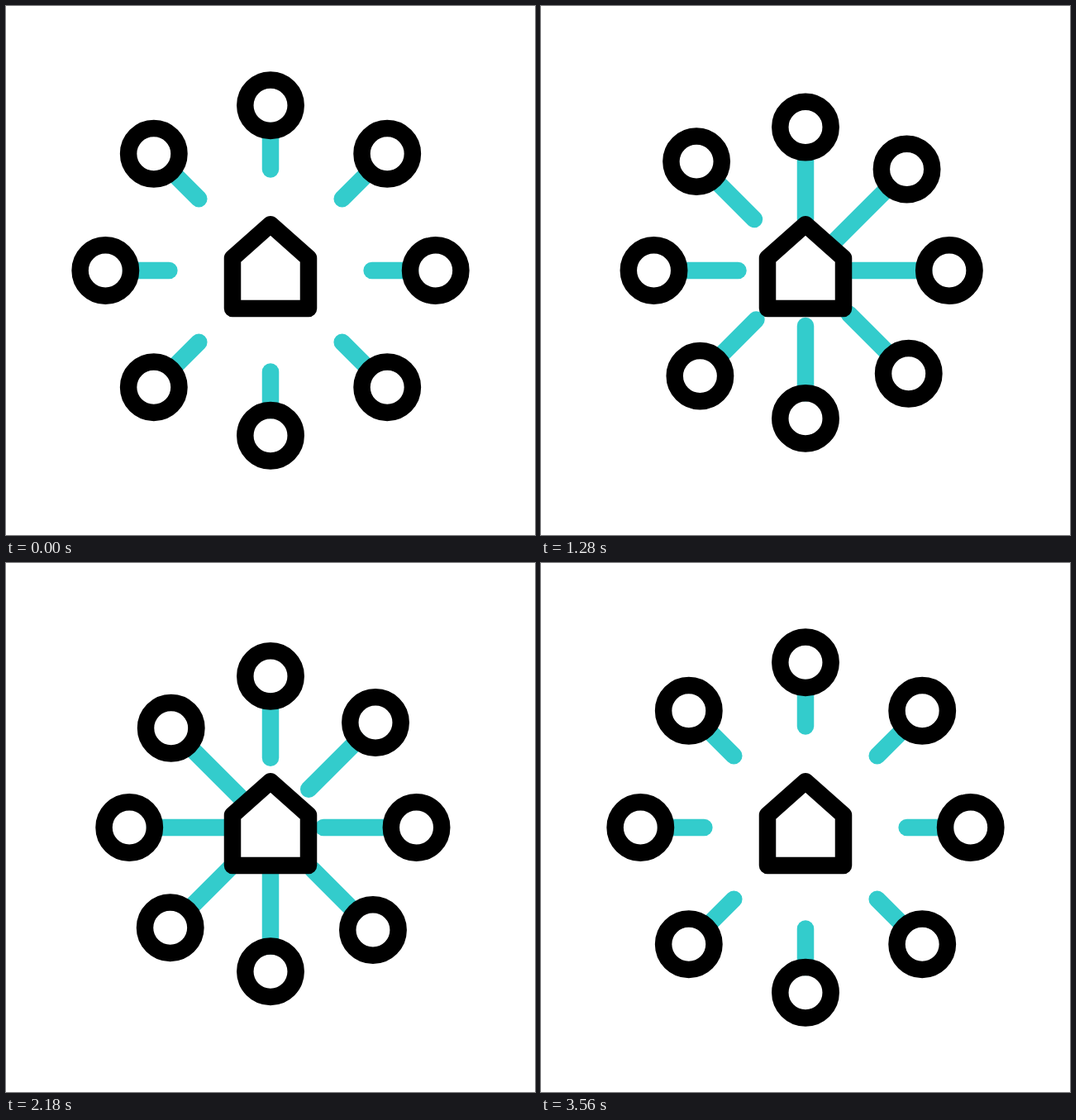
An HTML page that plays this animation: 640 by 640 pixels, repeating every 3600 ms.

```html
<!DOCTYPE html>
<html lang="en">
<head>
<meta charset="utf-8">
<title>Home network</title>
<style>
  html, body { margin: 0; width: 100%; height: 100%; overflow: hidden; background: #fff; }
  svg { display: block; width: 100%; height: 100%; }
</style>
</head>
<body>
<svg viewBox="0 0 640 640" fill="none" stroke="#000" stroke-width="20.5" stroke-linecap="round" stroke-linejoin="round">
  <g id="spokes" transform="translate(320 320)"></g>
  <path d="M274 305 L320 264.2 L366 305 V366 H274 Z"/>
</svg>
<script>
const LOOP = 3600, HALF = 1500, START = 15, STAGGER = 80;
const RING_AT = 199.7, TIP_AT = 122.6, RING_R = 30.7;

// Inward travel of [ring, line tip], clockwise from the top.
const travel = [
  [27.2, 63], [28.4, 81], [29.3, 74], [28.4, 59],
  [28, 75], [29.6, 59], [29.6, 75], [29.8, 79]
];

const root = document.getElementById('spokes');

function add(parent, tag, attrs) {
  const el = document.createElementNS('http://www.w3.org/2000/svg', tag);
  for (const key in attrs) el.setAttribute(key, attrs[key]);
  return parent.appendChild(el);
}

const spokes = travel.map(([ring, tip], i) => {
  const g = add(root, 'g', { transform: `rotate(${i * 45})` });
  return {
    ring, tip,
    delay: START + i * STAGGER,
    line: add(g, 'line', { x1: 0, x2: 0, stroke: '#33cccc' }),
    circle: add(g, 'circle', { cx: 0, r: RING_R })
  };
});

// cubic-bezier(.5, 0, .5, 1)
function ease(x) {
  if (x <= 0) return 0;
  if (x >= 1) return 1;
  let lo = 0, hi = 1;
  for (let i = 0; i < 24; i++) {
    const s = (lo + hi) / 2;
    if (1.5 * s * (1 - s) + s * s * s < x) lo = s;
    else hi = s;
  }
  return lo * lo * (3 - 2 * lo);
}

function draw(t) {
  for (const s of spokes) {
    const x = (t - s.delay) / HALF;
    const p = x < 1 ? ease(x) : 1 - ease(x - 1);
    const r = RING_AT - s.ring * p;
    s.circle.setAttribute('cy', -r);
    s.line.setAttribute('y1', RING_R - r);
    s.line.setAttribute('y2', s.tip * p - TIP_AT);
  }
}

const begin = performance.now();
function tick() {
  draw((performance.now() - begin) % LOOP);
  requestAnimationFrame(tick);
}
draw(0);
requestAnimationFrame(tick);
</script>
</body>
</html>
```
